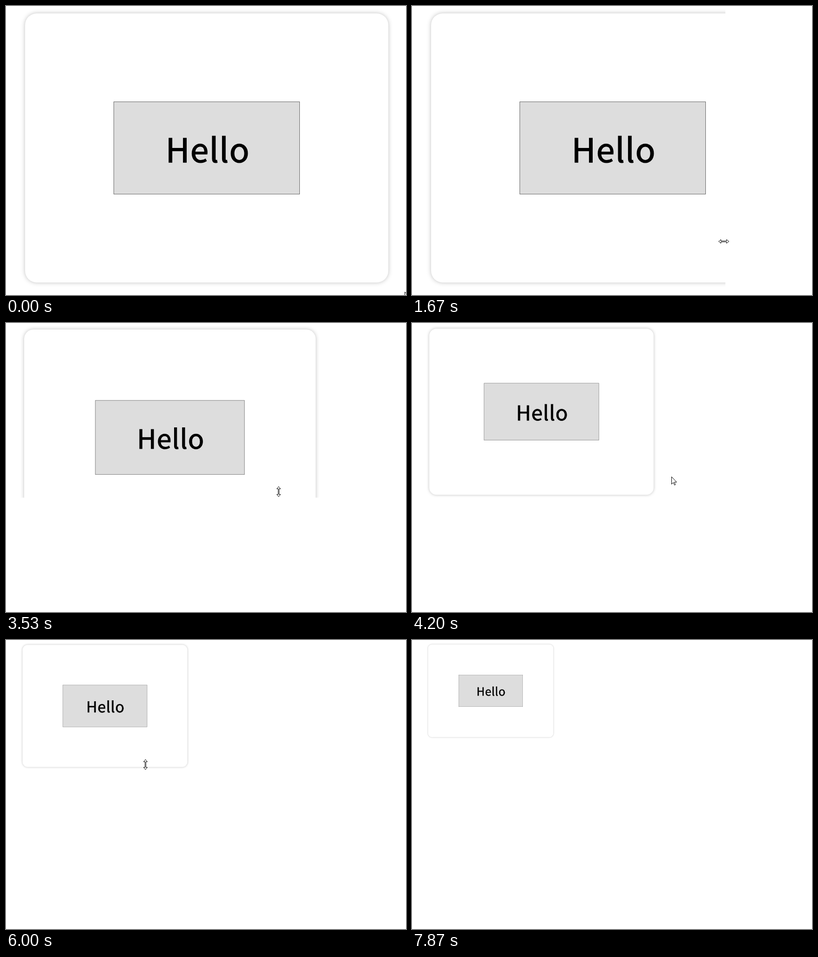
An HTML page for the animation above (8.19 s loop, 859 by 623 pixels).

```html
<!DOCTYPE html>
<html lang="en">
<head>
<meta charset="utf-8">
<title>Scaling panel</title>
<style>
  html, body { margin: 0; width: 100%; height: 100%; overflow: hidden; background: #fff; }
  svg { display: block; }
  .card { fill: #fff; filter: drop-shadow(0 0 5px rgba(0, 0, 0, .25)); }
  .box { fill: #ddd; stroke: #666; }
  text {
    font: 400 71px "Noto Sans CJK JP", "Noto Sans CJK SC", "Noto Sans CJK", sans-serif;
    letter-spacing: 1.35px;
    stroke: #000;
    stroke-width: 1.3px;
    text-rendering: geometricPrecision;
  }
  #cursor path { fill: #fff; stroke: #000; }
</style>
</head>
<body>
<svg width="859" height="623" viewBox="0 0 859 623">
  <clipPath id="view"><rect id="window" x="31" y="6"/></clipPath>
  <g clip-path="url(#view)">
    <g id="panel">
      <rect class="card" x="10" y="10" width="780" height="580" rx="25"/>
      <rect class="box" x="200.5" y="200.5" width="399" height="199"/>
      <text x="311.7" y="330.8">Hello</text>
    </g>
  </g>
  <g id="cursor"><path/></g>
</svg>
<script>
const LOOP = 8190, FPS = 15;
const ARROW = 'M.5.5v16l3.7-3.6 2.6 5.6 2-1-2.4-5.4h5z';
const RESIZE = 'M-10.5.5l5-4v3h12v-3l5 4-5 4v-3h-12v3z';

// [tick, cursor x, cursor y, cursor kind, window size as a share of 800 x 600]
const keys = [
  [0, 856, 616, 'arrow', 1],
  [5, 827, 540, 'h', 1],
  [10, 827, 540, 'h', 1],
  [20, 682, 510, 'h', .81875],
  [22, 682, 510, 'h', .81875],
  [25, 669, 507, 'h', .8025],
  [29, 669, 507, 'arrow', .8025],
  [35, 669, 507, 'arrow', .8025],
  [40, 607, 474, 'v', .8025],
  [43, 607, 474, 'v', .8025],
  [53, 585, 363, 'v', .6175],
  [56, 585, 363, 'arrow', .6175],
  [59, 585, 363, 'arrow', .6175],
  [69, 505, 272, 'h', .6175],
  [75, 505, 272, 'h', .6175],
  [82, 375, 243, 'h', .45375],
  [86.5, 375, 243, 'arrow', .45375],
  [90, 299, 268, 'v', .45375],
  [94, 299, 268, 'v', .45375],
  [101, 291, 206, 'v', .345],
  [110.5, 291, 206, 'arrow', .345],
  [118, 95, 630, 'arrow', .345],
  [124, 95, 630, 'arrow', .345]
];

// Ticks at which a drag is released and the panel rescales
const releases = [29, 56, 84, 102];
const scales = [1, .8025, .6175, .45375, .345];

const byId = id => document.getElementById(id);
const frame = byId('window'), panel = byId('panel'), cursor = byId('cursor');
const shape = cursor.firstElementChild;
const ease = u => u * u * (3 - 2 * u);

function draw(now) {
  const tick = Math.floor((now % LOOP + 4) * FPS / 1000);
  const next = keys.findIndex(key => key[0] > tick);
  const a = keys[next - 1], b = keys[next];
  const u = ease((tick - a[0]) / (b[0] - a[0]));
  const mix = i => a[i] + (b[i] - a[i]) * u;

  const stage = releases.filter(t => t <= tick).length;
  const scale = scales[stage], size = mix(4);
  const sideways = stage % 2 === 0;
  frame.setAttribute('width', 800 * (sideways ? size : scale));
  frame.setAttribute('height', 600 * (sideways ? scale : size));
  panel.setAttribute('transform', `translate(31 6) scale(${scale})`);

  cursor.setAttribute('transform', `translate(${Math.round(mix(1))} ${Math.round(mix(2))})`);
  shape.setAttribute('d', a[3] === 'arrow' ? ARROW : RESIZE);
  shape.setAttribute('transform', a[3] === 'v' ? 'rotate(90 .5 .5)' : '');
}

let start;
function loop(now) {
  start ??= now;
  draw(Math.max(0, now - start));
  requestAnimationFrame(loop);
}
draw(0);
requestAnimationFrame(loop);
</script>
</body>
</html>
```
